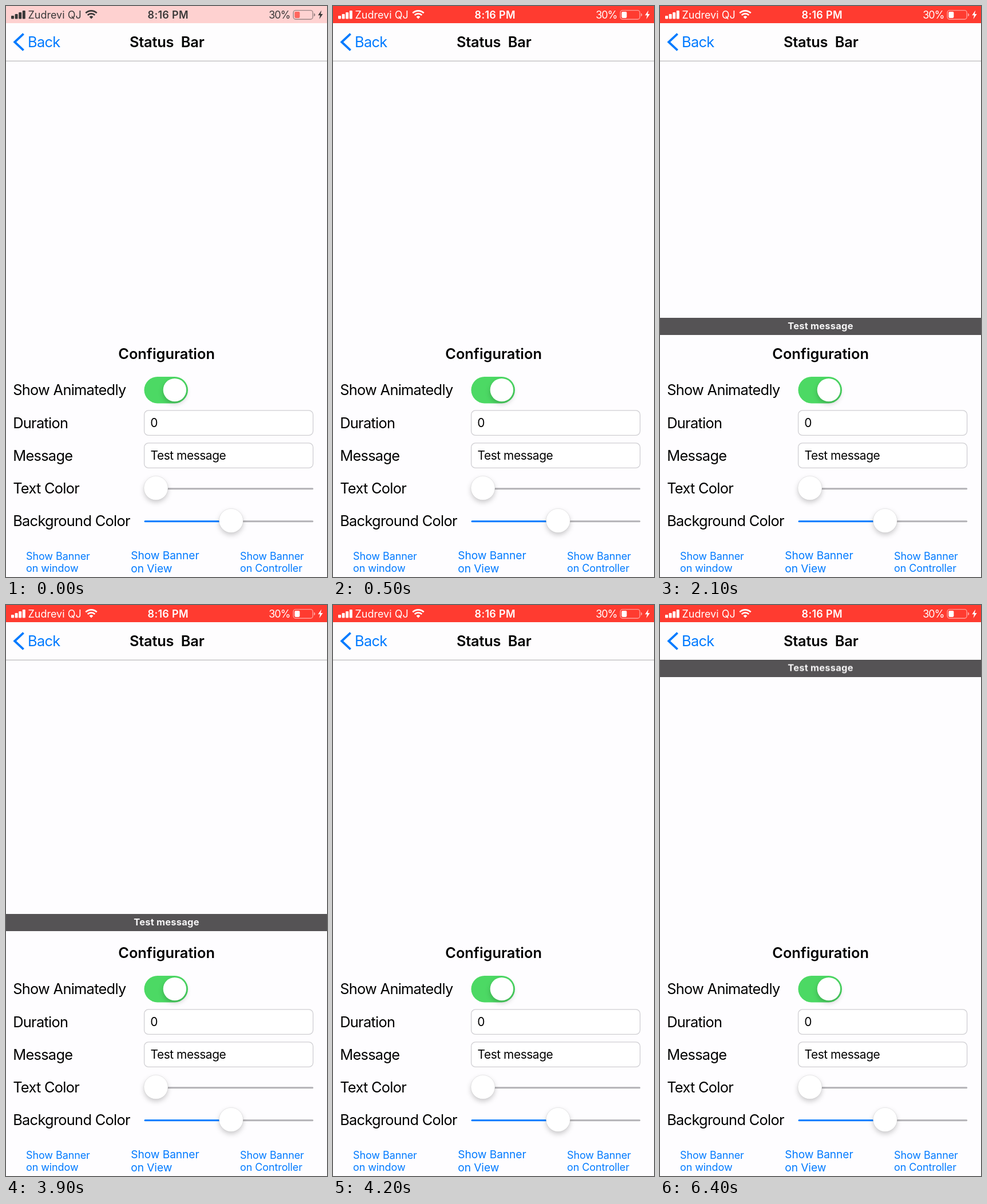
Write an HTML page that moves like this. It is 561x998 px and loops after 8 s.

```html
<!DOCTYPE html>
<html lang="en">
<head>
<meta charset="utf-8">
<title>Status Bar</title>
<style>
  html, body { margin: 0; width: 100%; height: 100%; overflow: hidden; background: #fefdff; }
  svg { display: block; width: 561px; height: 998px; }
  text { font-family: Inter, "Liberation Sans", sans-serif; white-space: pre; }

  .label { font-size: 25.4px; letter-spacing: -.72px; }
  .head { font-size: 25.4px; font-weight: 600; text-anchor: middle; }
  .input { font-size: 20.9px; letter-spacing: -.45px; }
  .link { font-size: 18px; letter-spacing: -.1px; }
  .link.big { font-size: 19.2px; }
  .blue { fill: #007aff; }
  .field { fill: #fff; stroke: #cfced2; stroke-width: 1.3; }
  .track { stroke: #b3b2b6; stroke-width: 3; stroke-linecap: round; }
  .track.on { stroke: #007aff; }
  .knob { fill: #fff; filter: drop-shadow(0 4px 4px rgba(0, 0, 0, .2)); }
  .slider .knob { stroke: rgba(0, 0, 0, .1); stroke-width: .8; }

  .status text { font-size: 18px; }
  .dark { color: #000; --charge: #ff3b30; }
  .light { color: #fff; --charge: #fff; animation: redden 8s step-end infinite; }

  .banner { animation: slide 8s step-end infinite; }
  .banner text { font-size: 16.5px; font-weight: 700; letter-spacing: .2px; fill: #f6f5f6; text-anchor: middle; }

  @keyframes redden {
    0% { opacity: .22; }
    1.25% { opacity: .55; }
    2.5% { opacity: .87; }
    3.75%, 100% { opacity: 1; }
  }

  /* In and out of the view (545), then from under the navigation bar (95.5) */
  @keyframes slide {
    0% { transform: translateY(-100px); }
    22.5% { transform: translateY(522px); }
    23.75% { transform: translateY(534px); }
    25% { transform: translateY(543.2px); }
    26.25% { transform: translateY(545px); }
    48.75% { transform: translateY(540px); }
    50% { transform: translateY(528.5px); }
    51.25% { transform: translateY(518px); }
    52.5% { transform: translateY(-100px); }
    76.25% { transform: translateY(72.5px); }
    77.5% { transform: translateY(84.4px); }
    78.75% { transform: translateY(93.7px); }
    80%, 100% { transform: translateY(95.5px); }
  }
</style>
</head>
<body>
<svg viewBox="0 0 561 998" xmlns="http://www.w3.org/2000/svg">
  <defs>
    <g id="status" class="status" fill="currentColor">
      <rect x="9" y="17" width="5" height="5.5" rx="1"/>
      <rect x="15.6" y="14" width="5" height="8.5" rx="1"/>
      <rect x="22.2" y="11" width="5" height="11.5" rx="1"/>
      <rect x="28.8" y="8" width="5" height="14.5" rx="1"/>
      <text x="38.5" y="22">Zudrevi QJ</text>
      <g fill="none" stroke="currentColor" stroke-width="2.7">
        <path d="M139.3 12.3a14 14 0 0 1 19.4 0"/>
        <path d="M142.7 15.9a9.2 9.2 0 0 1 12.6 0"/>
      </g>
      <path d="M149 22.5l-3.4-3.6a5 5 0 0 1 6.8 0z"/>
      <text x="283.2" y="22" font-weight="600" letter-spacing=".3" text-anchor="middle">8:16 PM</text>
      <text x="459.2" y="22" letter-spacing="-1">30%</text>
      <rect x="502.2" y="7.6" width="34" height="15.6" rx="4" fill="none" stroke="currentColor" stroke-width="1.4" opacity=".5"/>
      <path d="M538 12.6q2.4.8 2.4 2.8t-2.4 2.8z" opacity=".5"/>
      <rect x="504.4" y="9.9" width="9" height="11" rx="1.8" style="fill: var(--charge)"/>
      <path d="M551.4 7.5L545.3 16.2h3.7l-1.5 6.8 6.2-8.9h-3.8z"/>
    </g>
  </defs>

  <rect width="561" height="998" fill="#fefdff"/>

  <text class="head" x="280.6" y="617">Configuration</text>

  <text class="label" x="12.2" y="680">Show Animatedly</text>
  <rect x="241.5" y="648" width="76.5" height="46.4" rx="23.2" fill="#4cd964"/>
  <circle class="knob" cx="294.9" cy="671.1" r="20.2"/>

  <text class="label" x="12.2" y="738">Duration</text>
  <rect class="field" x="241.6" y="706.8" width="295" height="43.6" rx="7.5"/>
  <text class="input" x="252.2" y="736">0</text>

  <text class="label" x="12.2" y="795">Message</text>
  <rect class="field" x="241.6" y="763.8" width="295" height="43.6" rx="7.5"/>
  <text class="input" x="252.6" y="792.7">Test message</text>

  <g class="slider">
    <text class="label" x="12.2" y="851.7">Text Color</text>
    <path class="track" d="M243 843.8H535.7"/>
    <circle class="knob" cx="262" cy="842.6" r="21"/>
  </g>

  <g class="slider">
    <text class="label" x="12.2" y="908.7">Background Color</text>
    <path class="track" d="M393 900.7H535.7"/>
    <path class="track on" d="M243 900.7H393"/>
    <circle class="knob" cx="393.4" cy="899.5" r="21"/>
  </g>

  <g class="blue">
    <text class="link" x="35" y="967.5">Show Banner<tspan x="35" y="988.5">on window</tspan></text>
    <text class="link big" x="218.3" y="967">Show Banner<tspan x="218.3" y="990">on View</tspan></text>
    <text class="link" x="409" y="967.5">Show Banner<tspan x="409" y="988.5">on Controller</tspan></text>
  </g>

  <g class="banner">
    <rect width="561" height="30" fill="#555355"/>
    <text x="280.5" y="20.2">Test message</text>
  </g>

  <rect y="30" width="561" height="65.5" fill="#fefdfe"/>
  <rect y="95.5" width="561" height="1.5" fill="#000" opacity=".22"/>
  <path d="M30.6 48.6L15.2 63l15.4 14.4" fill="none" stroke="#007aff" stroke-width="3.8"/>
  <text class="label blue" x="38" y="72">Back</text>
  <text class="head" x="281.2" y="72" letter-spacing="-.2">Status  Bar</text>

  <g class="dark">
    <rect width="561" height="30" fill="#fefdff"/>
    <use href="#status"/>
  </g>
  <g class="light">
    <rect width="561" height="30" fill="#ff3b30"/>
    <use href="#status"/>
  </g>
</svg>
</body>
</html>
```
